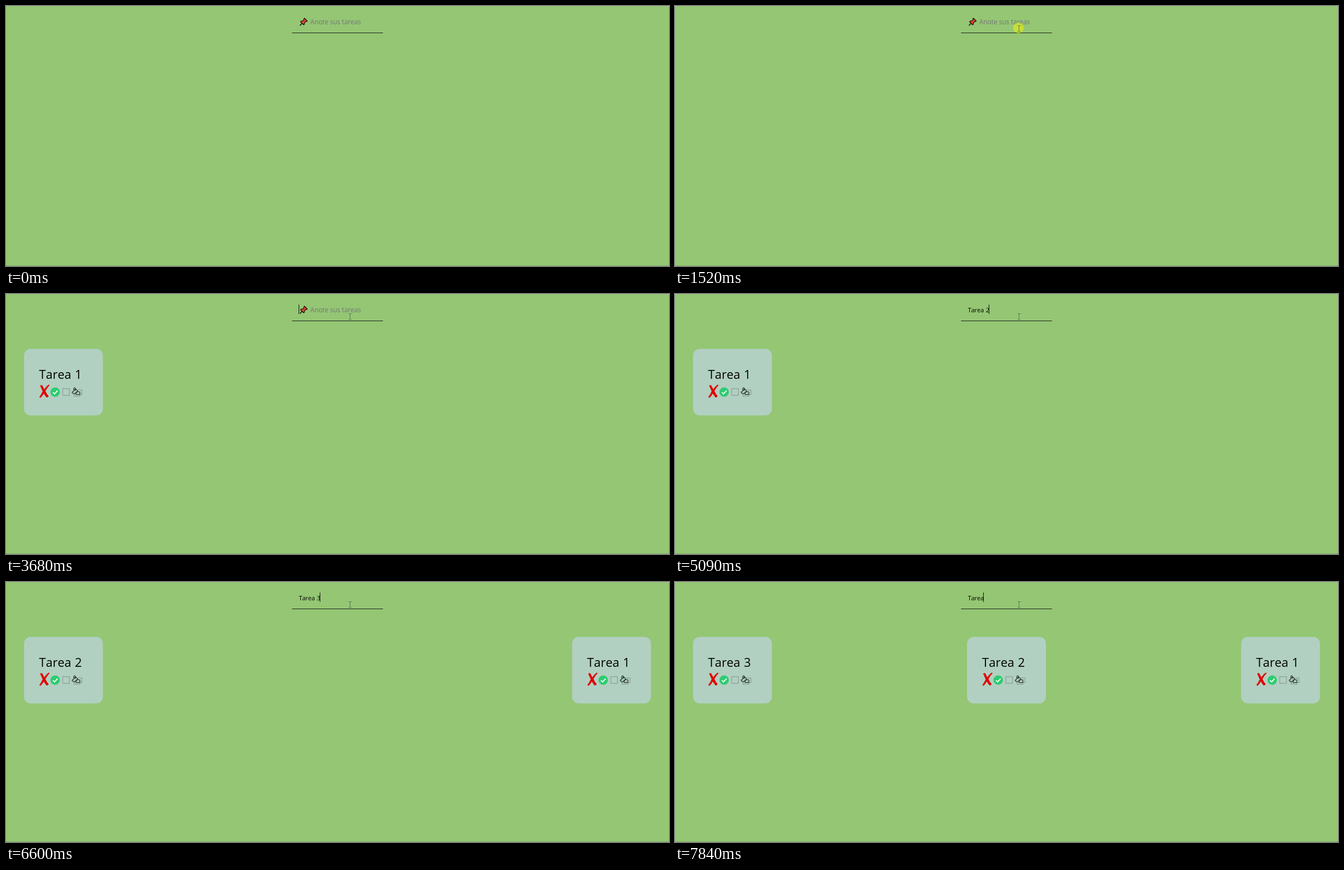
These frames come from a looping animation (1194 by 469 pixels, 7.99 s). An HTML page:

```html
<!DOCTYPE html>
<html lang="es">
<head>
<meta charset="utf-8">
<title>Lista de tareas</title>
<style>
  html, body { margin: 0; width: 100%; height: 100%; overflow: hidden; background: #94c674; }
  svg { display: block; width: 1194px; height: 469px; }
  text { font-family: "Open Sans", "Noto Sans", sans-serif; font-kerning: none; white-space: pre; }
  #typed { font-size: 11px; word-spacing: .45px; }
  #hint text { font-size: 11.75px; fill: #757575; }
  .title { font-size: 22px; word-spacing: .9px; }
  .line { fill: none; stroke: #8da69a; stroke-width: 1.4; }
  .ink { fill: none; stroke: #26302b; stroke-width: 1.2; stroke-linejoin: round; }
</style>
</head>
<body>
<svg viewBox="0 0 1194 469">
  <defs>
    <g id="card">
      <rect width="142" height="120" rx="12" fill="#b1d0c1"/>
      <path fill="#e00404" d="M29 66.5 Q31 64.5 33 66 L36.5 73 Q40 67 44.5 64.5 L46 65.5 Q41.5 70 38.5 76 Q41 82 44.5 85.5 L41 88 Q38 85 35.5 80.5 Q32.5 86 29.5 88.5 L27.5 86.5 Q31 82.5 33.5 76.5 Q31 71 29 66.5Z"/>
      <circle cx="56" cy="78" r="8.5" fill="#2ecc71"/>
      <path d="M52 78.3 L55 81.2 L60.3 75.4" fill="none" stroke="#fff" stroke-width="1.8"/>
      <rect class="line" x="69.7" y="71.7" width="12" height="12"/>
      <path class="line" d="M90 77 V85.2 H100.5 V82 M97 74.2 H104.3 V82.3 H97"/>
      <path class="ink" d="M91 70 L97 76.5 L91.5 81 Q88 81.5 86.5 78.5 L92 73 M89.5 76 V71.5 Q91 68.5 92.5 71.5 V75"/>
      <path class="ink" d="M93.7 77.5 H100.5 V82.3 H93.7Z"/>
    </g>
  </defs>

  <rect width="1194" height="469" fill="#94c674"/>
  <rect y="468" width="1194" height="1" fill="#80ab64"/>
  <rect x="515" y="48" width="164" height="1" fill="#1c2218"/>

  <g id="hint">
    <path d="M533.5 31 L529.3 35.2" stroke="#111" stroke-width="1.6"/>
    <path d="M537.5 22 L542.5 27 L541 28.2 L539.8 28 L537.6 30.3 L537.3 33 L536 34 L530.5 28.5 L531.5 27.2 L534.3 27 L536.7 24.6 L536.4 23.2Z" fill="#e8432a" stroke="#111" stroke-width="1.2" stroke-linejoin="round"/>
    <text x="548" y="33">Anote sus tareas</text>
  </g>
  <text id="typed" x="527.4" y="33"></text>
  <rect id="caret" y="19" width="1" height="17" fill="#111"/>
  <g id="cards"></g>

  <circle id="press" cx="618.5" cy="39.5" r="9.5" fill="#dce91c" fill-opacity=".7"/>
  <path id="arrow" d="M.5 .5 V10 L2.8 8 L4.3 11.4 L5.9 10.7 L4.4 7.4 H7.5Z" fill="#fff" stroke="#111" stroke-width=".8"/>
  <path id="beam" d="M617 35.5 H619 L619.5 36 L620 35.5 H622.5 M619.5 36 V45.5 M617 46 H619 L619.5 45.5 L620 46 H622.5" fill="none" stroke="#5f7550" stroke-width="1"/>
</svg>
<script>
const LOOP = 7990;
const [hint, typed, caret, cards, press, arrow, beam] =
  ["hint", "typed", "caret", "cards", "press", "arrow", "beam"].map(id => document.getElementById(id));

// Key times of each entry; the last one of a full entry is Enter.
const entries = [
  [2380, 2700, 2800, 2920, 3070, 3150, 3300, 3680],
  [4000, 4320, 4450, 4600, 4760, 4860, 5090, 5320],
  [5560, 5850, 5980, 6120, 6280, 6370, 6600, 6830],
  [7150, 7450, 7570, 7700, 7840]
];
const slots = [[32.5], [32.5, 1019.5], [32.5, 526, 1019.5]];

const show = (node, on) => node.setAttribute("visibility", on ? "visible" : "hidden");

function pointer(t) {
  if (t < 1220) {
    const step = Math.floor((Math.min(t, 1150) - 150) / 111.1 + .01);
    const rest = (1 - step / 9) ** 2;
    return [639 + 365 * rest, 57 + 356 * rest];
  }
  const step = Math.floor((t - 1220) / 70) + 1;
  return [639 - 6 * step, 57 - 5.5 * step];
}

let shownCards = 0;
function setCards(count) {
  if (count === shownCards) return;
  shownCards = count;
  cards.innerHTML = (slots[count - 1] || []).map((x, i) =>
    `<g transform="translate(${x} 99)"><use href="#card"/>` +
    `<text class="title" x="27" y="54">Tarea ${count - i}</text></g>`).join("");
}

function draw(t) {
  const done = entries.filter(keys => t >= keys[7]).length;
  const length = entries[done].filter(key => t >= key).length;
  const value = `Tarea ${done + 1}`.slice(0, length);

  if (typed.textContent !== value) typed.textContent = value;
  show(hint, !length);
  const width = length ? typed.getComputedTextLength() : 0;
  caret.setAttribute("x", Math.max(527, Math.floor(526.8 + width)));
  show(caret, t >= 1610 && !(t >= 2060 && t < entries[0][0]));
  setCards(done);

  show(press, t >= 1520 && t < 1670);
  show(beam, t >= 1430);
  show(arrow, t >= 150 && t < 1430);
  if (t >= 150 && t < 1430) {
    const [x, y] = pointer(t);
    arrow.setAttribute("transform", `translate(${Math.round(x)} ${Math.round(y)})`);
  }
}

function tick() {
  draw(performance.now() % LOOP);
  requestAnimationFrame(tick);
}
tick();
</script>
</body>
</html>
```
